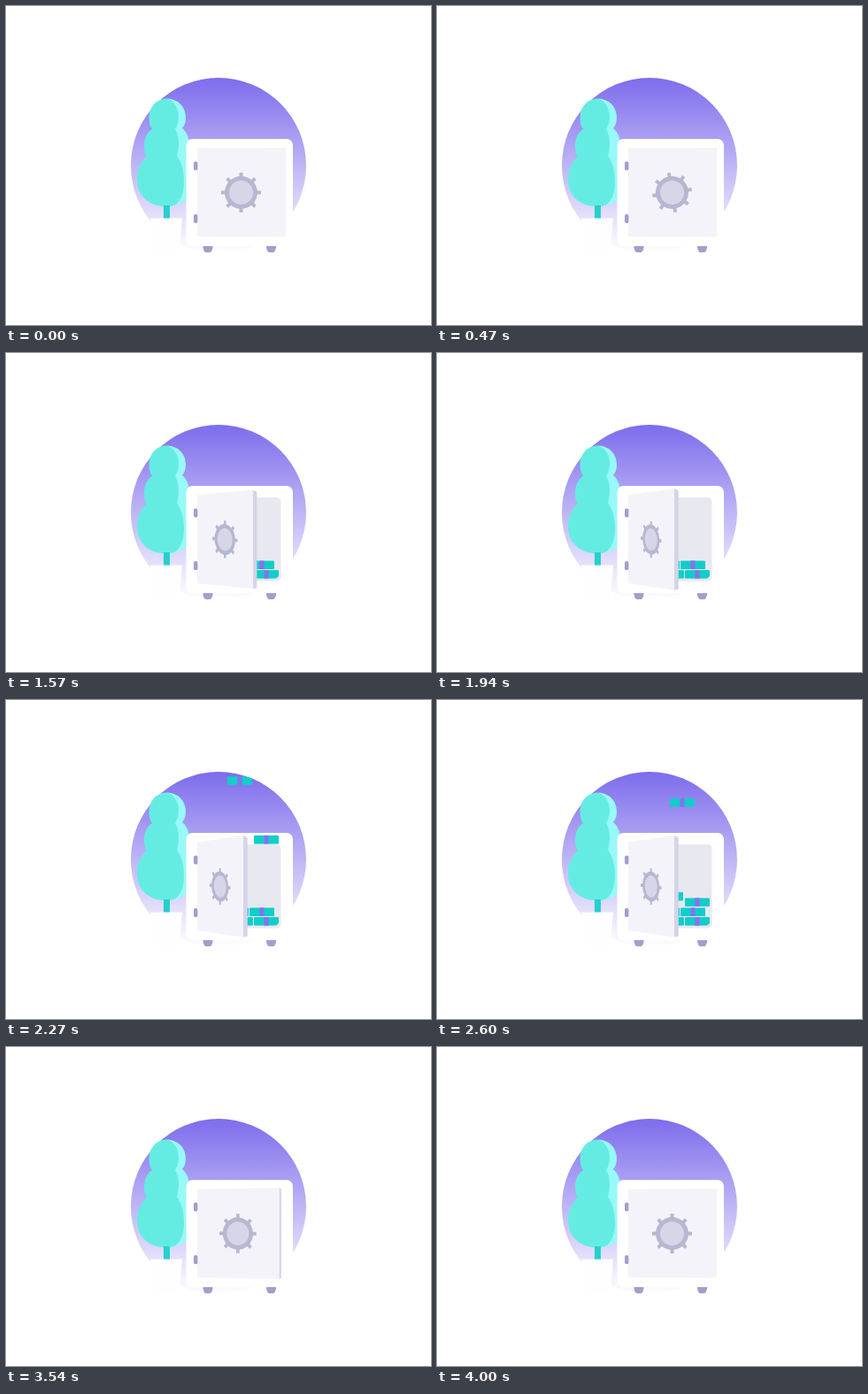
Write an HTML page that moves like this. It is 480 px wide and 360 px high and loops after 4030 ms.

```html
<!DOCTYPE html>
<html lang="en">
<head>
<meta charset="utf-8">
<title>Safe</title>
<style>
  html, body { margin: 0; width: 100%; height: 100%; overflow: hidden; background: #fff; }
  svg { display: block; width: 480px; height: 360px; }
</style>
</head>
<body>
<svg viewBox="0 0 480 360">
  <defs>
    <linearGradient id="sky" x1="0" y1="0" x2="0" y2="1">
      <stop offset="0" stop-color="#7d6cec"/>
      <stop offset="1" stop-color="#fff"/>
    </linearGradient>
    <clipPath id="disc"><circle cx="240" cy="180" r="99"/></clipPath>
    <g id="cash">
      <rect width="28" height="9.6" rx="1" fill="#12cdc8"/>
      <rect x="11.5" width="5" height="9.6" fill="#8a6ff0"/>
    </g>
    <path id="foot" d="M222.5 270.5h11v2q-1 5-3 5.5h-5q-2-.5-3-5.5z" fill="#a09fcd"/>
    <rect id="hinge" x="212" width="4.4" height="10" rx="1.8" fill="#a29fcb"/>
    <rect id="tooth" x="-2" y="-22.5" width="4" height="6" rx=".5"/>
  </defs>

  <circle cx="240" cy="180" r="99" fill="url(#sky)"/>

  <path fill="#97f9f8" d="M182 104.500C195 105 203 114 203 126C203 131 202 134 199 138C207 144 209 158 205 168C212 176 215 190 215 198C215 214 200 226 182 226Z"/>
  <path fill="#65ece2" d="M182 104.500C190 107 195 115 195 125C195 131 193 136 191 139C196 146 196 160 193 169C199 177 201 188 201 198C201 210 198 220 190 225Q185 226.500 178 226C158 225 148 211 148 196C148 184 153 175 159 170C154 162 155 145 165 139C158 128 161 105 182 104.500Z"/>
  <rect x="178" y="225" width="7" height="15" fill="#25d0cf"/>
  <path d="M163 239.500H199L196 274Q195.500 278 192 278H171Q167.500 278 167 274Z" fill="#fefeff"/>

  <use href="#foot"/><use href="#foot" x="71.500"/>
  <rect x="203.500" y="150" width="120.500" height="121" rx="7" fill="#fff"/>
  <rect x="222" y="163" width="88.500" height="94.500" rx="5" fill="#e8e8f0"/>
  <g id="stack" clip-path="url(#disc)"></g>

  <path id="edge" fill="#d5d4e9" stroke="#d5d4e9" stroke-linejoin="round"/>
  <path id="panel" fill="#f3f3f9" stroke="#f3f3f9" stroke-linejoin="round"/>
  <g id="face">
    <g id="gear" fill="#b7b7d0">
      <circle r="18.500"/>
      <circle r="13.500" fill="#d7d6e9"/>
    </g>
  </g>
  <use href="#hinge" y="175.500"/><use href="#hinge" y="235"/>
</svg>
<script>
const LOOP = 4030, FALL = 505, TOP = 70;
const $ = id => document.getElementById(id);

function use(parent, href, attrs) {
  const el = document.createElementNS("http://www.w3.org/2000/svg", "use");
  el.setAttribute("href", href);
  for (const k in attrs) el.setAttribute(k, attrs[k]);
  return parent.appendChild(el);
}

for (let a = 0; a < 360; a += 45) use($("gear"), "#tooth", { transform: `rotate(${a})` });

// x, resting y, start of the fall (none: already inside)
const bundles = [
  [251, 245], [280, 245], [246, 234.4], [275, 234.4],
  [280, 223.4, 1900], [250, 223.4, 2107], [263, 212.4, 2330]
].map(([x, y, start]) => ({ y, start, el: use($("stack"), "#cash", { x, y }) }));

const progress = (t, start, length) => Math.min(1, Math.max(0, (t - start) / length));
const ease = p => p < .5 ? 2 * p * p : 1 - 2 * (1 - p) ** 2;

function drawDoor(open) {
  const w = 100 - 48 * open, x = 215.5 + w, h = 7 * open;
  const depth = 4.6 * Math.sqrt(1 - (w / 100) ** 2) * 1.2;
  const top = 160.5 - h, bottom = 260 + h;
  $("panel").setAttribute("d", `M216.5 161L${x} ${top}V${bottom}L216.5 259.5Z`);
  $("edge").setAttribute("d", `M${x} ${top}L${x + depth} ${top + depth * .4}V${bottom - depth * .1}L${x} ${bottom}Z`);
  $("face").setAttribute("transform",
    `matrix(${w / 100} ${.07 * open} 0 ${1 - .08 * open} ${216 + w * .495} 210.5)`);
}

function frame(now) {
  const t = now % LOOP;
  drawDoor(ease(progress(t, 1030, 820)) - ease(progress(t, 2940, 830)));
  $("gear").setAttribute("transform", `rotate(${180 * ease(progress(t, 0, 770))})`);
  for (const { y, start, el } of bundles) {
    if (!start) continue;
    el.setAttribute("y", TOP + (y - TOP) * progress(t, start, FALL) ** 2);
    el.setAttribute("visibility", t < start ? "hidden" : "visible");
  }
  requestAnimationFrame(frame);
}
frame(0);
</script>
</body>
</html>
```
